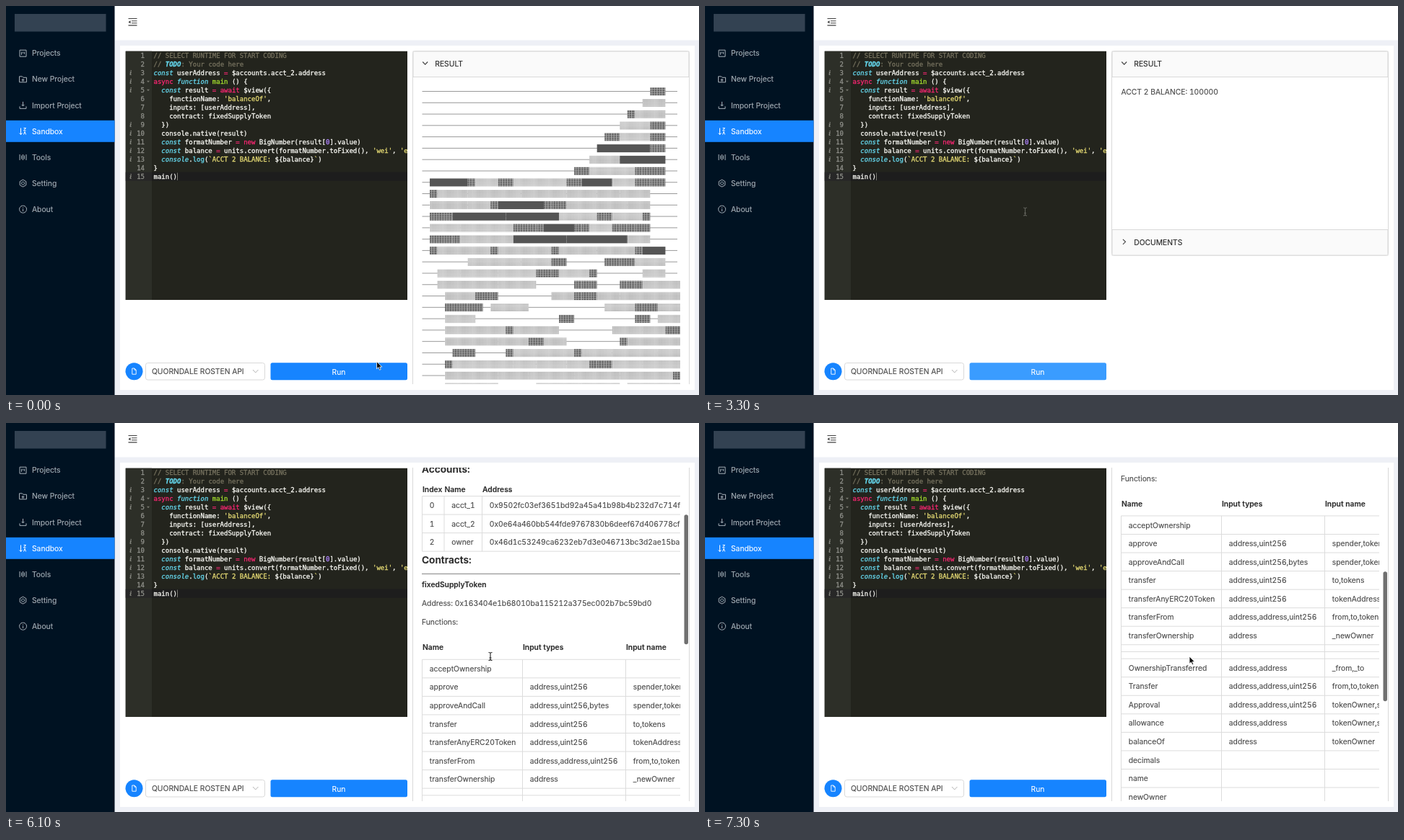
An HTML page for the animation above (7.4 s loop, 960 px wide and 540 px high).

```html
<!DOCTYPE html>
<html lang="en">
<head>
<meta charset="utf-8">
<title>Sandbox</title>
<style>
html, body { margin: 0; width: 100%; height: 100%; overflow: hidden; background: #fff; }
svg { display: block; width: 960px; height: 540px; }
text {
  font: 10.3px Inter, sans-serif; font-variant-numeric: tabular-nums; white-space: pre;
  color: #484848; fill: currentColor; stroke: currentColor; stroke-width: .12;
}
.dark { color: #262626; }
.bold { font-weight: 600; color: #2c2c2c; }
.h2 { font-size: 13.7px; font-weight: 600; color: #262626; }
.code { font: 9px "DejaVu Sans Mono", monospace; color: #fbfbf6; stroke-width: .3; }
.num { color: #8f908a; text-anchor: end; }
.info { font: italic bold 9px "Noto Serif", serif; color: #85867f; }
.w { color: #fbfbf6; }
.c { color: #75715e; }
.t { color: #66d9ef; font-style: italic; font-weight: bold; }
.b { color: #66d9ef; font-style: italic; }
.l { color: #66d9ef; }
.p { color: #f92672; }
.g { color: #a6e22e; }
.s { color: #e6db74; }
.n { color: #ae81ff; }
.line { fill: none; stroke: #404040; stroke-width: 1.1; }
.grid { fill: none; stroke: #dcdcdc; }
</style>
</head>
<body>
<svg id="stage" viewBox="0 0 960 540" xmlns="http://www.w3.org/2000/svg"></svg>
<script>
const LOOP = 7400, CLEAR = 1400, OUTPUT = 2100, OPEN = 5000;
const BLUE = '#1684ff', LIGHT = '#3a9cff';

const text = (x, y, str, cls = '', extra = '') => `<text x="${x}" y="${y}" class="${cls}" ${extra}>${str}</text>`;
const rect = (x, y, w, h, fill, extra = '') => `<rect x="${x}" y="${y}" width="${w}" height="${h}" fill="${fill}" ${extra}/>`;
const path = (d, extra = 'class="line"') => `<path d="${d}" ${extra}/>`;

function sidebar() {
  const items = [
    ['Projects', 'M-4.5 -4.5h9v9h-9zM-2 -2v4M0 -2v2M2 -2v3'],
    ['New Project', 'M-5 -4h4l1.5 1.5h4.500v6.500h-10zM0 -1v4M-2 1h4'],
    ['Import Project', 'M-4.500 1.500v3h9v-3M0 -5v6M-2 -1l2 2 2 -2'],
    ['Sandbox', 'M-3 -4.500v9M-5 2.500l2 2 2 -2M1 -4.500h3l-3 3.500h3M1 4.500l1.500 -4 1.500 4'],
    ['Tools', 'M-4.500 -4v8M-2 -2.500v5M0 -4v8M2 -2.500v5M4.500 -4v8'],
    ['Setting', 'M0 -5l4.300 2.500v5l-4.300 2.500 -4.300 -2.500v-5zM0 -2a2 2 0 1 0 .1 0'],
    ['About', 'M0 -5a5 5 0 1 0 .1 0M0 -.5v3.200M0 -2.700v1'],
  ];
  return rect(0, 0, 150.5, 540, '#001222') + rect(12, 11, 126.5, 24.5, '#334252') +
    rect(0, 158.8, 150.5, 30, BLUE) +
    items.map(([label, icon], i) => {
      const y = 65.7 + 36.08 * i, color = i === 3 ? '#fff' : '#a9b1b9';
      return path(icon, `transform="translate(23.5 ${y})" fill="none" stroke="${color}"`) +
        text(36, y + 3.7, label, '', `style="color:${color}"`);
    }).join('');
}

// "~x" switches to the style class x
const codeLines = [
  '~c// SELECT RUNTIME FOR START CODING',
  '~c// ~tTODO~c: Your code here',
  '~bconst~w userAddress ~p=~w $accounts.acct_2.address',
  '~pasync~w ~bfunction~w ~gmain~w () {',
  '  ~bconst~w result ~p=~w ~pawait~w $view({',
  "    functionName: ~s'balanceOf'~w,",
  '    inputs: [userAddress],',
  '    contract: fixedSupplyToken',
  '  })',
  '  console.native(result)',
  '  ~bconst~w formatNumber ~p=~w ~pnew~w BigNumber(result[~n0~w].value)',
  "  ~bconst~w balance ~p=~w units.convert(formatNumber.toFixed(), ~s'wei'~w, ~s'ether'~w)",
  '  ~bconsole~w.~llog~w(~s`ACCT 2 BALANCE: ~w${balance}~s`~w)',
  '}',
  'main()',
];

function editor() {
  const noted = [3, 4, 5, 9, 10, 11, 12, 13, 15];
  const lines = codeLines.map((line, i) => {
    const y = 71.6 + 12.02 * i;
    const spans = ('~w' + line).split('~').slice(1)
      .map(part => `<tspan class="${part[0]}">${part.slice(1)}</tspan>`).join('');
    return text(204.5, y, spans, 'code') + text(192, y, i + 1, 'code num') +
      (noted.includes(i + 1) ? text(171, y, 'i', 'info') : '') +
      (i === 3 || i === 4 ? path(`M195 ${y - 4}h4l-2 2.5z`, 'fill="#77786f"') : '');
  }).join('');
  return `<g clip-path="url(#editorClip)">` + rect(165.5, 62.5, 391, 345.5, '#23241d') +
    rect(165.5, 62.5, 36.5, 345.5, '#2d2f28') + rect(165.5, 230.7, 36.5, 12, '#272727') +
    rect(202, 230.7, 354, 12, '#1d1d1d') + lines + rect(237, 231.5, 1, 10.5, '#77776f') + '</g>';
}

function controls() {
  return rect(365, 493.5, 193, 28, 'none', 'id="wave" rx="4" stroke="#cfe5ff" stroke-width="3"') +
    `<circle cx="177.5" cy="507.2" r="12" fill="${BLUE}"/>` +
    path('M174.800 503h3.200l2.200 2.200v6h-5.400zM178 503v2.200h2.200', 'fill="none" stroke="#fff" stroke-width=".9"') +
    rect(193.5, 495.5, 165, 23.5, '#fff', 'rx="3" stroke="#d9d9d9"') +
    text(202, 511, 'QUORNDALE ROSTEN API') +
    path('M342 505l3.700 4 3.700 -4', 'fill="none" stroke="#b5b5b5"') +
    rect(366.5, 495.3, 189.5, 24, BLUE, 'id="run" rx="2.5"') +
    text(461, 511.5, 'Run', '', 'text-anchor="middle" style="color:#fff"');
}

// Console output: ruled rows with a wedge of shaded block characters
function blockArt() {
  const cell = 10.53, left = 576.5;
  let seed = 7, out = '';
  const random = () => (seed = seed * 16807 % 2147483647) / 2147483647;
  for (let row = 0; row < 27; row++) {
    const y = 118.5 + 15.78 * row;
    const start = row < 8 ? Math.round(30 - 1.4 * row) : row < 15 ? 1 : row < 18 ? 2 : 3;
    const end = 32 - (row > 8 && row < 14 ? 2 : 0) + (row > 16 ? 2 : 0);
    out += path(`M${left} ${y}H930`, 'stroke="#999"');
    for (let col = start; col < end;) {
      const length = Math.min(end - col, 1 + Math.floor(random() ** 2 * 8));
      const pick = random(), gap = row > 14 && pick > .8;
      const fill = length < 3 ? 'url(#dense)' : pick < .8 ? 'url(#shade)' : '#555';
      if (!gap) out += rect(left + col * cell, y - 5.3, length * cell, 11, fill);
      col += length;
    }
  }
  return out;
}

const functions = [
  ['acceptOwnership', '', ''],
  ['approve', 'address,uint256', 'spender,tokens'],
  ['approveAndCall', 'address,uint256,bytes', 'spender,tokens,data'],
  ['transfer', 'address,uint256', 'to,tokens'],
  ['transferAnyERC20Token', 'address,uint256', 'tokenAddress,tokens'],
  ['transferFrom', 'address,address,uint256', 'from,to,tokens'],
  ['transferOwnership', 'address', '_newOwner'],
  null, null,
  ['OwnershipTransferred', 'address,address', '_from,_to'],
  ['Transfer', 'address,address,uint256', 'from,to,tokens'],
  ['Approval', 'address,address,uint256', 'tokenOwner,spender,tokens'],
  ['allowance', 'address,address', 'tokenOwner,spender'],
  ['balanceOf', 'address', 'tokenOwner'],
  ['decimals', '', ''],
  ['name', '', ''],
  ['newOwner', '', ''],
];
const accounts = [
  ['0', 'acct_1', '0x9502fc03ef3651bd92a45a41b98b4b232d7c714f'],
  ['1', 'acct_2', '0x0e64a460bb544fde9767830b6deef67d406778cf'],
  ['2', 'owner', '0x46d1c53249ca6232eb7d3e046713bc3d2ae15ba3'],
];

// A null row is a thin empty separator
function table(headY, top, columns, heads, rows) {
  let y = top, out = heads.map((h, i) => text(columns[i] + .5, headY, h, 'bold')).join('');
  let lines = `M576.5 ${y}H940`;
  for (const row of rows) {
    const height = row ? 25.55 : 9.7;
    if (row) out += row.map((s, i) => text(columns[i] + 10.3, y + 16.6, s)).join('');
    y += height;
    lines += `M576.5 ${y}H940`;
  }
  lines += columns.map(x => `M${x} ${top}V${y}`).join('');
  return path(lines, 'class="grid"') + out;
}

function documents() {
  return text(576, 69, 'Accounts:', 'h2') +
    table(96, 101.5, [576.5, 607, 659.5], ['Index', 'Name', 'Address'], accounts) +
    text(576, 195, 'Contracts:', 'h2') + rect(576, 208.8, 364, 1.3, '#999') +
    text(576, 228, 'fixedSupplyToken', 'bold') +
    text(576, 254.3, 'Address: 0x163404e1b68010ba115212a375ec002b7bc59bd0') +
    text(576, 280.3, 'Functions:') +
    table(315, 328.3, [576.5, 715.5, 858.5], ['Name', 'Input types', 'Input name'], functions);
}

const header = (id, y, label) => rect(564, y, 382, 35.5, '#fafafa', 'stroke="#d9d9d9"') +
  path('M-1.800 -3.500L1.800 0L-1.800 3.500', `id="${id}" class="line"`) + text(594.3, y + 21.4, label, 'dark');

function panel() {
  return `<g clip-path="url(#panelClip)"><g id="scroller">
    ${rect(563.5, 62.7, 383, 100, '#fff', 'id="frame" rx="3" stroke="#d9d9d9"')}
    ${header('resultArrow', 63, 'RESULT')}
    <g clip-path="url(#contentClip)"><g id="art">${blockArt()}</g></g>
    <g id="output">${text(576.5, 122.5, 'ACCT 2 BALANCE: 100000')}</g>
    <g id="docs">${header('docsArrow', 98.5, 'DOCUMENTS')}
      <g id="docsBody" clip-path="url(#docsClip)"><g transform="translate(0 157)">${documents()}</g></g>
    </g></g>
    ${rect(939.5, 0, 5.5, 180, '#707070', 'id="thumb" rx="2.7"')}</g>`;
}

const pointers = {
  arrow: path('M0 0V10.200L2.400 8.100L4 11.700L5.700 11L4.200 7.500H7.300Z', 'fill="#111" stroke="#fff" stroke-width=".8"'),
  hand: path('M-1 0.500Q0 -.700 1 .500V4.300L4.600 5Q6.300 5.500 6 7.300L5 11.500H-.500L-3.500 7.500Q-3.200 6 -1 7.500Z',
    'fill="#fff" stroke="#222" stroke-width="1"') + path('M1 4.500v2M3 5v2M4.700 5.500v1.500', 'stroke="#222" stroke-width=".7"'),
  beam: path('M-2.500 -5.500Q0 -5.500 0 -4V4Q0 5.500 -2.500 5.500M2.500 -5.500Q0 -5.500 0 -4M0 4Q0 5.500 2.500 5.500M-1.500 2h3',
    'fill="none" stroke="currentColor" stroke-width="1.1"'),
};

const clip = (id, x, y, w, h) => `<clipPath id="${id}">${rect(x, y, w, h, '#000')}</clipPath>`;
document.getElementById('stage').innerHTML = `<defs>
  ${clip('editorClip', 165.5, 62.5, 390.5, 345.5)}${clip('panelClip', 560, 62, 390, 463)}
  ${clip('contentClip', 570, 99, 364, 430)}${clip('docsClip', 570, 134, 364, 1200)}
  <pattern id="dense" width="3.51" height="2.9" patternUnits="userSpaceOnUse">
    ${rect(0, 0, 3.51, 2.9, '#bbb')}${rect(.3, .3, 2.6, 2.1, '#505050')}</pattern>
  <pattern id="shade" width="2.1" height="2.1" patternUnits="userSpaceOnUse">
    ${rect(0, 0, 2.1, 2.1, '#dcdcdc')}${rect(0, 0, 1.1, 1.1, '#979797')}</pattern>
  </defs>` +
  rect(0, 0, 960, 540, '#eef0f6') + rect(150.5, 0, 809.5, 47.5, '#fff') + rect(158, 55, 796, 478, '#fff') +
  sidebar() + path('M169.500 17.500h12M174 20.700h7.500M174 23.700h7.500M169.500 26.900h12') +
  path('M172.500 20v4.400l-3 -2.200z', 'fill="#404040"') +
  editor() + controls() + panel() +
  Object.entries(pointers).map(([kind, shape]) => `<g id="${kind}">${shape}</g>`).join('');

const el = {};
document.querySelectorAll('#stage [id]').forEach(node => el[node.id] = node);
const show = (node, on) => node.setAttribute('visibility', on ? 'visible' : 'hidden');
const place = (node, x, y, angle = 0) => node.setAttribute('transform', `translate(${x} ${y}) rotate(${angle})`);
const clamp = v => Math.max(0, Math.min(1, v));
const smooth = v => v * v * (3 - 2 * v);

// time, x, y, pointer shape from that time on
const pointerKeys = [
  [0, 513.5, 493.5, 'arrow'], [200, 509, 507, 'hand'], [400, 503, 526, 'arrow'], [700, 501, 526, 'arrow'],
  [900, 496, 505.5, 'hand'], [2500, 496, 505.5, 'arrow'], [2800, 460, 340, 'beam'], [3000, 443.5, 285.5, 'beam'],
  [3400, 443.5, 285.5, 'beam'], [3700, 600, 318, 'hand'], [4000, 650, 331, 'hand'], [5100, 650, 331, 'arrow'],
  [5400, 671, 324, 'beam'], [7200, 671, 324, 'arrow'], [LOOP, 671, 324, 'arrow'],
];
const scrollKeys = [[0, 0], [5500, 0], [6100, 157], [6800, 288.3], [LOOP, 370]];

function between(keys, t, ease = v => v) {
  const next = keys.findIndex(key => key[0] > t), a = keys[next - 1], b = keys[next];
  const p = ease((t - a[0]) / (b[0] - a[0]));
  return a.map((v, i) => typeof v === 'number' ? v + (b[i] - v) * p : v);
}

function draw(t) {
  const opening = smooth(clamp((t - OPEN) / 300)), opened = t >= OPEN;
  const bodyHeight = t < CLEAR ? 500 : 212 * (1 - opening);
  const scroll = between(scrollKeys, t)[1];

  show(el.art, t < CLEAR);
  show(el.output, t >= OUTPUT && !opened);
  show(el.docsBody, opened);
  place(el.docs, 0, bodyHeight);
  place(el.scroller, 0, -scroll);
  el.frame.setAttribute('height', opened ? 1300 : bodyHeight + 71.5);
  place(el.resultArrow, 580.7, 79.3, 90 * (1 - opening));
  place(el.docsArrow, 580.7, 115.3, 90 * opening);
  show(el.thumb, scroll > 0);
  el.thumb.setAttribute('y', 65 + scroll * .396);

  const [, x, y, kind] = between(pointerKeys, t, smooth);
  for (const name in pointers) show(el[name], name === kind);
  place(el[kind], x, y);
  el.beam.setAttribute('color', x < 556 ? '#62635c' : '#222');

  const hovered = kind === 'hand' && y > 490;
  el.run.setAttribute('fill', hovered || (t >= CLEAR && !opened) ? LIGHT : BLUE);
  el.wave.setAttribute('opacity', t < CLEAR ? 0 : clamp(1 - (t - CLEAR) / 500));
}

function tick() {
  draw(Math.floor(performance.now() % LOOP / 100) * 100);
  requestAnimationFrame(tick);
}
tick();
</script>
</body>
</html>
```
